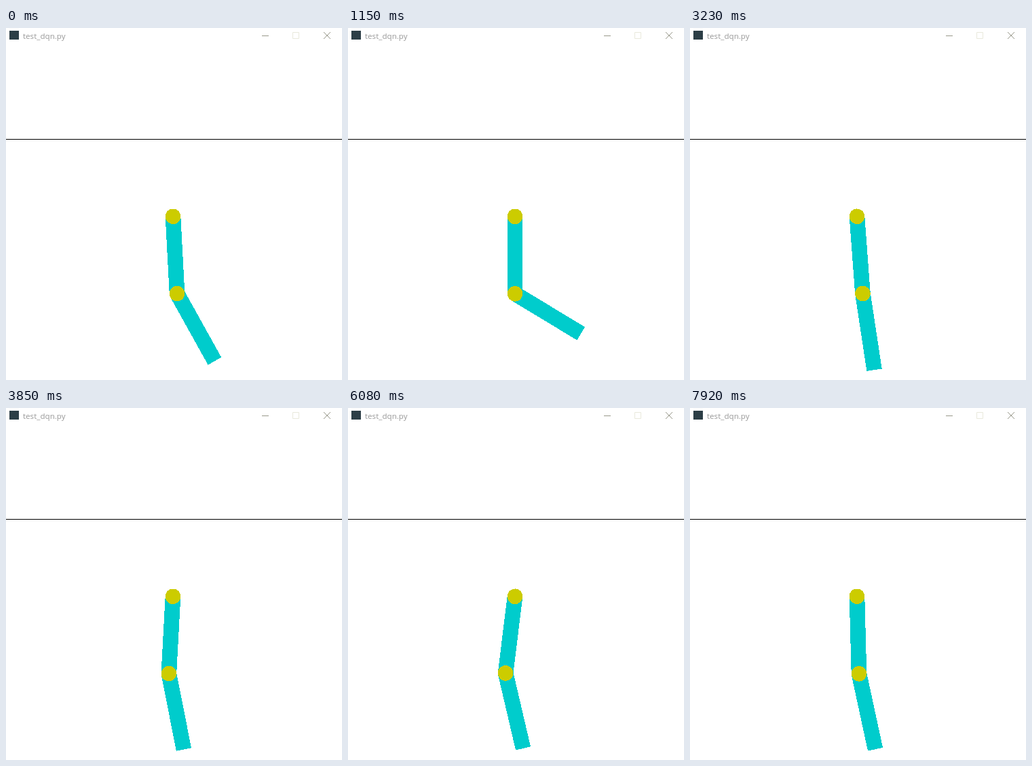
Recreate the animation shown at these times as an HTML page. Size 495 by 517 pixels, loop 8000 ms.

```html
<!DOCTYPE html>
<html lang="en">
<head>
<meta charset="utf-8">
<title>Double pendulum</title>
<style>
  html, body { margin: 0; width: 100%; height: 100%; overflow: hidden; background: #fff; }
  svg { display: block; width: 495px; height: 517px; }
  text { font: 11.6px "Open Sans", "Noto Sans", sans-serif; fill: #999; }
  .link { fill: #00cccc; }
  .joint { fill: #cccc00; }
  .button { fill: none; stroke: #98988a; }
</style>
</head>
<body>
<svg viewBox="0 0 495 517">
  <rect x="5" y="4" width="14" height="13" fill="#2c3e46"/>
  <text x="25" y="16">test_dqn.py</text>
  <path class="button" d="M377 11.5h10"/>
  <path class="button" d="M422.5 6.5h9v9h-9z" style="stroke:#e9e9dc"/>
  <path class="button" d="M468 6l10 10M478 6l-10 10"/>
  <rect y="163" width="495" height="1"/>
  <g shape-rendering="crispEdges">
    <g id="upper">
      <rect class="link" x="-11.3" width="22.6" height="113.5"/>
      <circle class="joint" r="11.3"/>
    </g>
    <g id="lower">
      <rect class="link" x="-11.3" width="22.6" height="113.5"/>
      <circle class="joint" r="11.3"/>
    </g>
  </g>
</svg>
<script>
const LOOP = 8000, STEP = 76.6, CLOCK_TICK = 10;
const LENGTH = 113.5, PIVOT = { x: 246, y: 276.8 };

const wave = (mean, size, period, peak) =>
  step => mean + size * Math.cos(2 * Math.PI * (step - peak) / period);

// Each take swings in two modes, then holds its last step until the next take.
const takes = [
  { start: 0, steps: 22,
    together: wave(.035, .2, 12.17, 2.19), opposed: wave(-.034, .19, 12.27, 8.865) },
  { start: 1930, steps: 34,
    together: wave(.025, .212, 16.73, 4.192), opposed: wave(0, .166, 9.05, .911) },
  { start: 5150, steps: 36,
    together: wave(.005, .046, 13.06, 9.88), opposed: wave(0, .165, 10.48, 7.43) }
];

const upper = document.getElementById("upper");
const lower = document.getElementById("lower");

function place(link, x, y, angle) {
  link.setAttribute("transform",
    `translate(${x} ${y}) rotate(${-angle * 180 / Math.PI})`);
}

function draw(time) {
  const take = takes.findLast(({ start }) => start <= time);
  const step = Math.min(take.steps, Math.floor((time - take.start + CLOCK_TICK) / STEP));
  const s = take.together(step), f = take.opposed(step);
  const first = s + f, second = 3.8 * s - .79 * f;
  place(upper, PIVOT.x, PIVOT.y, first);
  place(lower, PIVOT.x + LENGTH * Math.sin(first), PIVOT.y + LENGTH * Math.cos(first), second);
}

function tick() {
  draw(performance.now() % LOOP);
  requestAnimationFrame(tick);
}
tick();
</script>
</body>
</html>
```
